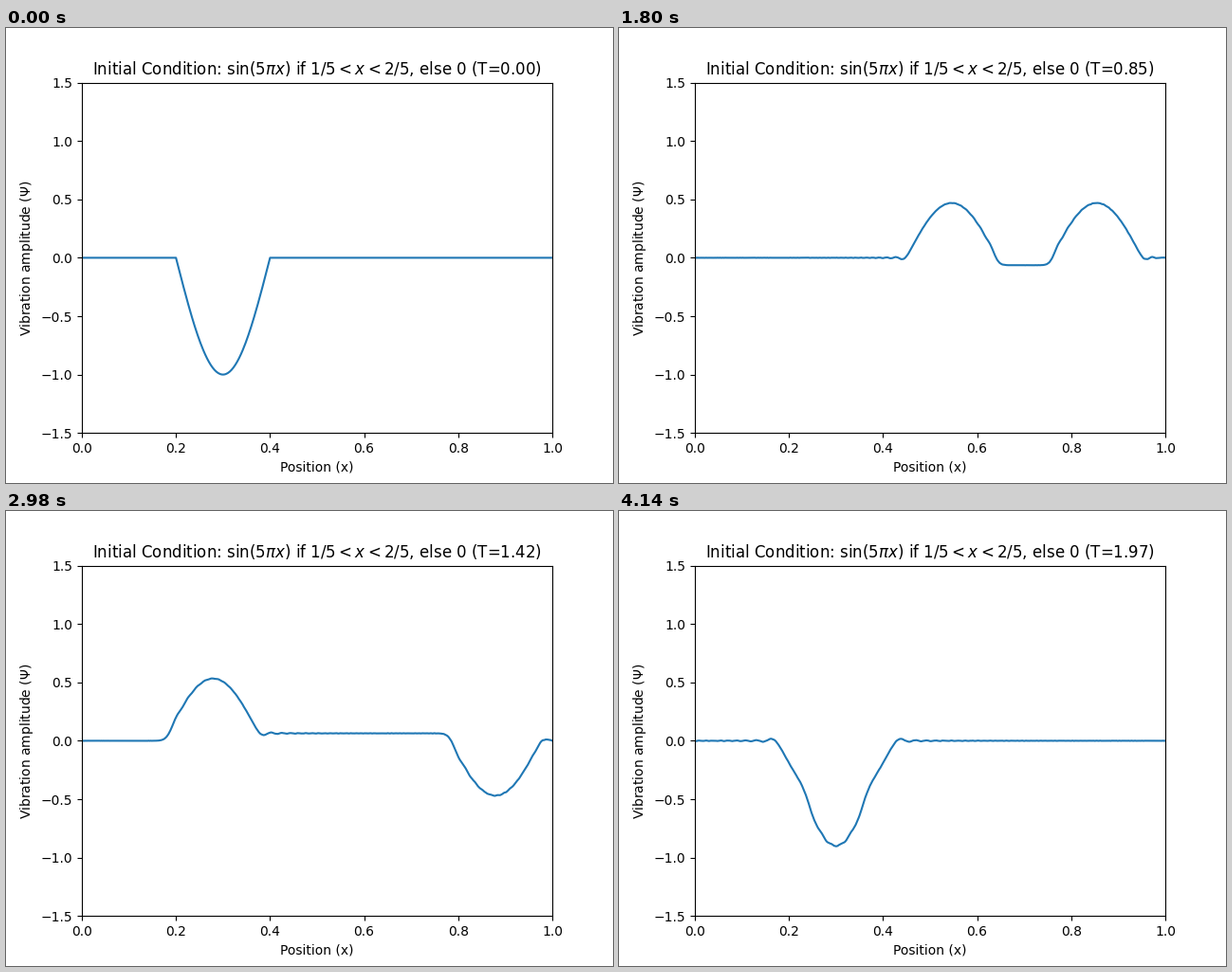
Animation of 640 by 480 pixels, one loop 4160 ms. Source, as a matplotlib script:

```python
import numpy as np
import matplotlib.pyplot as plt
from matplotlib.animation import FuncAnimation

DX, DT = 0.002, 0.001   # space and time steps, wave speed 1
STRIDE = 25             # solver steps between two poses
POSES = 80
SLOT_MS = 20
HOLDS = [1, 5, 1, 5, 1]  # slots each pose stays, repeated

x = np.linspace(0, 1, round(1 / DX) + 1)


def bump(x):
    return np.where((x > 0.2) & (x < 0.4), np.sin(5 * np.pi * x), 0.0)


def solve():
    """Leapfrog solution of the fixed string; starts with shape and velocity bump(x)."""
    c2 = (DT / DX) ** 2

    def pull(u):
        out = np.zeros_like(u)
        out[1:-1] = c2 * (u[2:] - 2 * u[1:-1] + u[:-2])
        return out

    prev = bump(x)
    cur = prev + DT * bump(x) + pull(prev) / 2
    poses = [prev]
    for step in range(1, STRIDE * (POSES - 1) + 1):
        if step % STRIDE == 0:
            poses.append(cur)
        prev, cur = cur, 2 * cur - prev + pull(cur)
    return poses


def title(pose):
    t = 5 * pose // 2 / 100
    return rf"Initial Condition: $\sin(5 \pi x)$ if $1/5<x<2/5$, else 0 (T={t:.2f})"


poses = solve()
schedule = np.repeat(np.arange(POSES), HOLDS * (POSES // len(HOLDS)))

fig, ax = plt.subplots(figsize=(6.4, 4.8), dpi=100)
line, = ax.plot(x, poses[0])
ax.set(xlim=(0, 1), ylim=(-1.5, 1.5), xlabel="Position (x)",
       ylabel=r"Vibration amplitude ($\Psi$)", title=title(0))


def update(slot):
    pose = int(schedule[slot])
    line.set_ydata(poses[pose])
    ax.set_title(title(pose))
    return line,


anim = FuncAnimation(fig, update, frames=len(schedule), interval=SLOT_MS,
                     repeat=True, repeat_delay=0)
plt.show()
```
